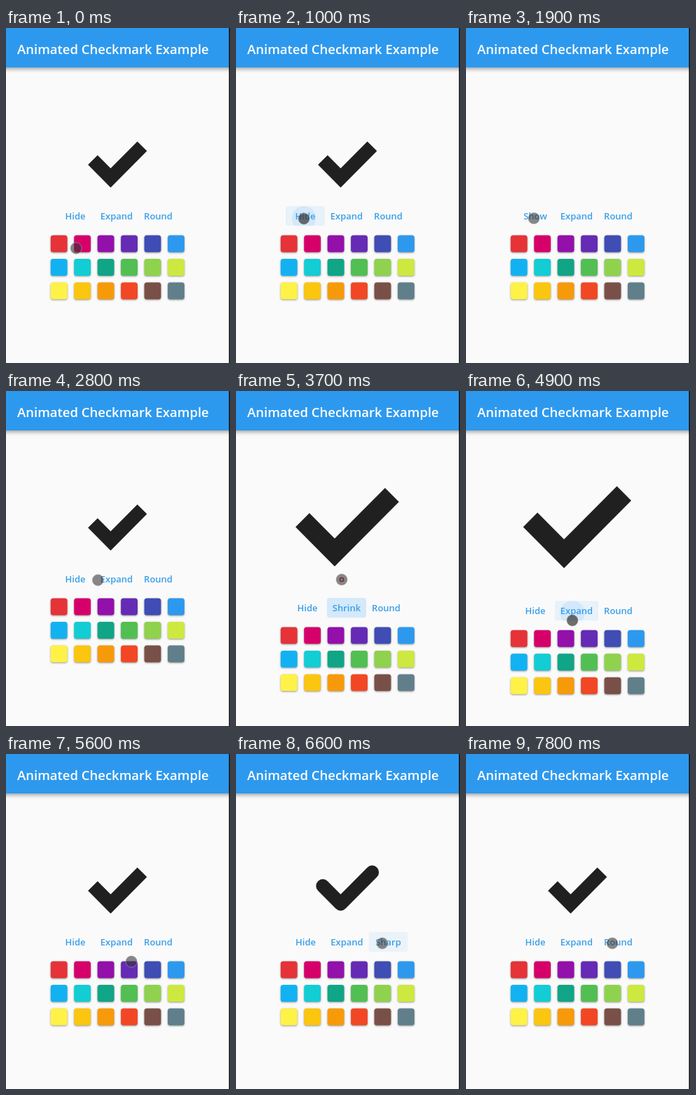
Write an HTML page with a canvas that moves like this. It is 320x476 px and loops after 8 s.

```html
<!DOCTYPE html>
<html lang="en">
<head>
<meta charset="utf-8">
<title>Animated Checkmark Example</title>
<style>
  html, body { margin: 0; width: 100%; height: 100%; overflow: hidden; background: #fafafa; }
  body { position: relative; font-family: "Open Sans", "Noto Sans", sans-serif; font-weight: 600; }
  canvas { position: absolute; left: 0; top: 0; width: 320px; height: 476px; }
  h1, .label { position: absolute; margin: 0; white-space: nowrap; line-height: 20px; }
  h1 { left: 16px; top: 20px; font-size: 18.5px; font-weight: 600; color: #fff; }
  .label { left: 0; top: 0; font-size: 13px; color: #3a9fe9; }
  .label span { display: block; transform: translateX(-50%); }
</style>
</head>
<body>
<canvas id="stage"></canvas>
<h1>Animated Checkmark Example</h1>
<div class="label"><span>Hide</span></div>
<div class="label"><span>Expand</span></div>
<div class="label"><span>Round</span></div>
<canvas id="top"></canvas>
<script>
const LOOP = 8000, W = 320, H = 476;
const BLUE = '#2d99ee';
const COLORS = [
  '#e53338', '#d6006a', '#9310ab', '#652bb4', '#3f4db4', '#2d99ee',
  '#12b2f2', '#12cdd4', '#10a586', '#52bf52', '#8fd24d', '#cde93f',
  '#fff246', '#fbc60f', '#f79a0a', '#f24724', '#795047', '#617f8b'
];
const BUTTON_W = { Hide: 56, Show: 56, Expand: 62, Shrink: 56, Round: 57, Sharp: 56 };

// time, button index, splash offset from the button's centre
const PRESSES = [
  [900, 0, -2, 3], [1920, 0, -2, 3],
  [3400, 1, -6, 0], [4795, 1, -6, 3],
  [6150, 2, -8, 2], [7200, 2, -8, 2]
];
// time, x, y
const PATH = [
  [0, 100, 313], [600, 98, 272], [1000, 97, 271], [2600, 97, 270],
  [2935, 150, 268], [3750, 151, 268], [4450, 152, 326], [4950, 152, 326],
  [5350, 149, 321], [5850, 209, 269], [8000, 209, 269]
];

const clamp = v => Math.max(0, Math.min(1, v));
const smooth = v => v * v * (3 - 2 * v);
const mix = (a, b, k) => a + (b - a) * k;
const ramp = (t, start, length) => smooth(clamp((t - start) / length));
const within = (t, a, b) => t >= a && t < b;

function layer(id) {
  const canvas = document.getElementById(id);
  const ratio = window.devicePixelRatio || 1;
  canvas.width = W * ratio;
  canvas.height = H * ratio;
  const c = canvas.getContext('2d');
  c.scale(ratio, ratio);
  return c;
}

const ctx = layer('stage'), top2d = layer('top');
const labels = [...document.querySelectorAll('.label')];

function box(x, y, w, h, r) {
  ctx.beginPath();
  ctx.roundRect(x, y, w, h, r);
}

function shadow(color, blur, dy) {
  ctx.shadowColor = color;
  ctx.shadowBlur = blur * (window.devicePixelRatio || 1);
  ctx.shadowOffsetY = dy * (window.devicePixelRatio || 1);
}

function drawHeader() {
  ctx.save();
  shadow('rgba(0,0,0,.4)', 6, 2);
  ctx.fillStyle = BLUE;
  ctx.fillRect(-10, -10, W + 20, 66);
  ctx.restore();
  ctx.fillStyle = '#0c0c0c';
  ctx.fillRect(318.5, 0, 1.5, H);
}

function drawCheck(size, shown, rounded) {
  if (shown <= 0) return;
  const x = mix(149.5, 140, size), y = mix(213, 231.3, size);
  const a = mix(25.5, 48.3, size), b = mix(45, 86, size);
  const drawn = shown * (a + b);
  const first = Math.min(a, drawn), second = drawn - first;
  ctx.beginPath();
  ctx.moveTo(x - a, y - a);
  ctx.lineTo(x - a + first, y - a + first);
  if (second > 0) ctx.lineTo(x + second, y - second);
  ctx.lineWidth = mix(19.4, 29, size);
  ctx.lineCap = rounded ? 'round' : 'butt';
  ctx.lineJoin = rounded ? 'round' : 'miter';
  ctx.strokeStyle = '#202020';
  ctx.stroke();
}

function drawPress(t, press, button, cy) {
  const age = t - press[0];
  if (age < 0 || age > 550) return;
  const fade = 1 - clamp((age - 320) / 230);
  ctx.save();
  box(button.x, cy - 14, button.w, 28, 3);
  ctx.clip();
  ctx.fillStyle = `rgba(33,150,243,${0.11 * clamp(age / 130) * fade})`;
  ctx.fill();
  ctx.beginPath();
  ctx.arc(button.x + button.w / 2 + press[2], cy + press[3], 6 + age * 0.11, 0, 7);
  ctx.fillStyle = `rgba(33,150,243,${0.1 * fade * (1 - clamp((age - 200) / 200) * 0.6)})`;
  ctx.fill();
  ctx.restore();
}

function drawButtons(t, cy) {
  const names = [
    within(t, 1040, 2060) ? 'Show' : 'Hide',
    within(t, 3500, 4890) ? 'Shrink' : 'Expand',
    within(t, 6270, 7320) ? 'Sharp' : 'Round'
  ];
  const total = names.reduce((sum, n) => sum + BUTTON_W[n], 0);
  let x = 158.5 - total / 2;
  const buttons = names.map((name, i) => {
    const w = BUTTON_W[name], button = { x, w };
    const span = labels[i].firstChild;
    if (span.textContent !== name) span.textContent = name;
    labels[i].style.transform = `translate(${x + w / 2}px, ${cy - 10}px)`;
    x += w;
    return button;
  });
  PRESSES.forEach(p => drawPress(t, p, buttons[p[1]], cy));
}

function drawSwatches(shift) {
  ctx.save();
  shadow('rgba(0,0,0,.4)', 2.5, 1);
  COLORS.forEach((color, i) => {
    ctx.fillStyle = color;
    box(63.8 + (i % 6) * 33.45, 294.6 + Math.floor(i / 6) * 33.5 + shift, 23.8, 23.8, 3.5);
    ctx.fill();
  });
  ctx.restore();
}

function drawPointer(t) {
  const i = Math.max(1, PATH.findIndex(p => p[0] > t));
  const [t0, x0, y0] = PATH[i - 1], [t1, x1, y1] = PATH[i];
  const k = ramp(t, t0, t1 - t0);
  const x = mix(x0, x1, k), y = mix(y0, y1, k);
  const down = PRESSES.some(p => within(t, p[0], p[0] + 130));
  top2d.clearRect(0, 0, W, H);
  top2d.beginPath();
  top2d.arc(x, y, 8.2, 0, 7);
  top2d.fillStyle = `rgba(50,50,50,${down ? 0.7 : 0.58})`;
  top2d.fill();
  top2d.lineWidth = 0.7;
  top2d.strokeStyle = 'rgba(215,215,215,.6)';
  top2d.stroke();
  if (within(t, 3600, 3800)) {
    top2d.beginPath();
    top2d.arc(x, y, 2.6, 0, 7);
    top2d.lineWidth = 1.4;
    top2d.strokeStyle = '#6b2529';
    top2d.stroke();
  }
}

function draw(t) {
  const size = ramp(t, 3500, 250) - ramp(t, 4890, 250);
  const shown = 1 - ramp(t, 1060, 500) + ramp(t, 2060, 500);
  const shift = 45.5 * size;
  ctx.fillStyle = '#fafafa';
  ctx.fillRect(0, 0, W, H);
  drawCheck(size, shown, within(t, 6270, 7320));
  drawButtons(t, 267 + shift);
  drawSwatches(shift);
  drawHeader();
  drawPointer(t);
}

const start = performance.now();
function tick() {
  draw((performance.now() - start) % LOOP);
  requestAnimationFrame(tick);
}
tick();
</script>
</body>
</html>
```
